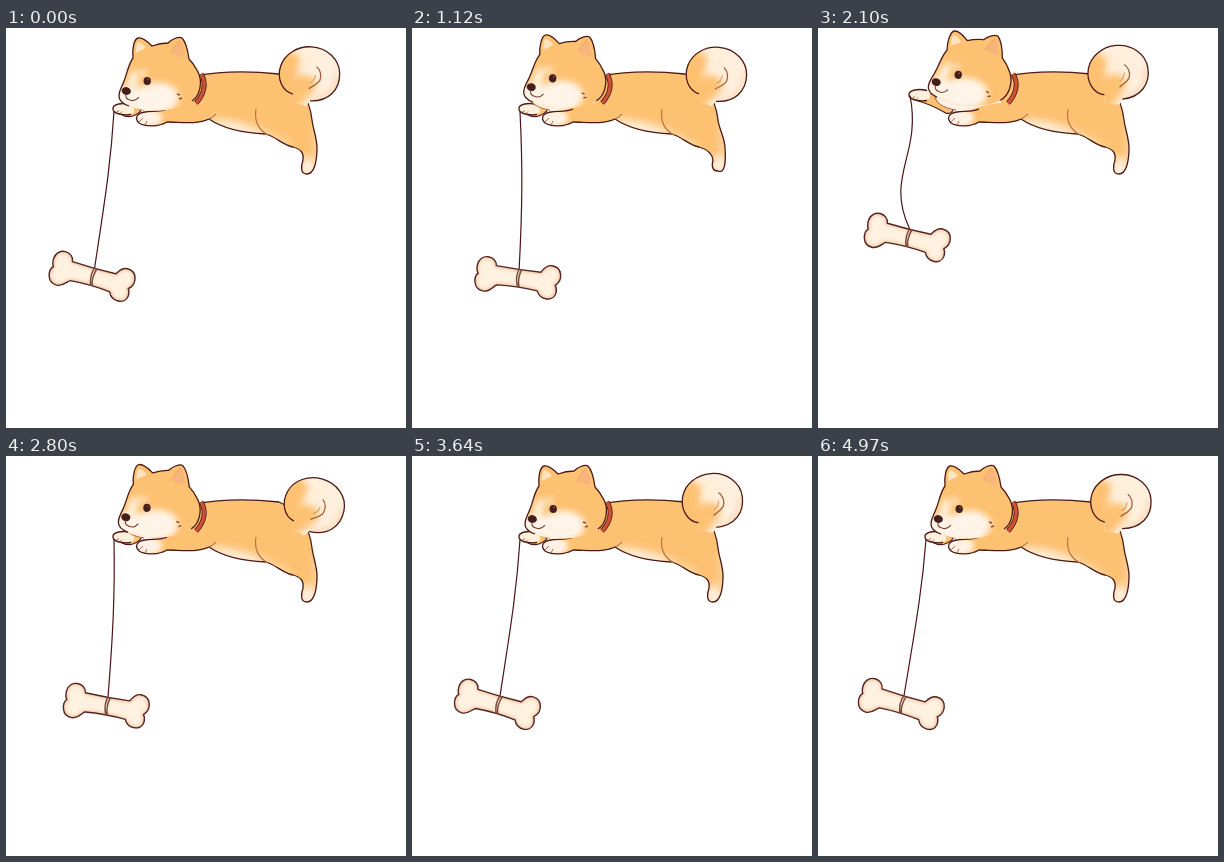
Animation, 400 px wide and 400 px high, one loop 5.04 s. Source, as an HTML page with a canvas:

```html
<!DOCTYPE html>
<html lang="en">
<head>
<meta charset="utf-8">
<title>Puppy with a bone on a string</title>
<style>
html, body { margin: 0; width: 100%; height: 100%; overflow: hidden; background: #fff; }
canvas { display: block; width: 100vmin; height: 100vmin; }
</style>
</head>
<body>
<canvas id="stage" width="400" height="400"></canvas>
<script>
const ctx = document.getElementById('stage').getContext('2d');
const LOOP = 5040, STEP = 70, STRING = 157.5;
const INK = '#4c1a16', ORANGE = '#fdc172', CREAM = '#fff0de', SHADE = '#eda866';

// [time, value] keys, eased between neighbours
const swing = [[-80, -22], [440, 24], [860, -22], [1290, 10], [1680, -9], [1980, 4], [2310, -11],
  [2600, -18], [3110, 18], [3650, -20], [4310, 24], [4960, -22], [5480, 24]];
const reach = [[1190, 0], [1610, 1], [2240, 1], [2470, 0]];
const slack = [[1680, 0], [2030, 25], [2120, 24], [2330, 0]];
const nod = [[560, 0], [1120, 0.055], [1610, 0.14], [2070, 0.125], [2300, 0.135], [2800, 0.025], [3080, 0]];
const wag = [[-280, -3], [350, 3], [910, -2], [1120, 1], [1610, 8], [2170, -6.5], [2850, 8],
  [3520, -6], [4240, 2], [4760, -3], [5390, 3]];
const kick = [[420, 0], [1120, 1], [1750, 0.3], [2100, 0]];
const twist = [[1260, 0], [1680, 5], [2100, 6], [2580, 0]];

function at(keys, t) {
  if (t <= keys[0][0]) return keys[0][1];
  for (let i = 1; i < keys.length; i++) {
    const [t0, a] = keys[i - 1], [t1, b] = keys[i];
    if (t <= t1) return a + (b - a) * (1 - Math.cos(Math.PI * (t - t0) / (t1 - t0))) / 2;
  }
  return keys[keys.length - 1][1];
}

function line(d, color = INK, width = 1.3) {
  ctx.strokeStyle = color;
  ctx.lineWidth = width;
  ctx.stroke(new Path2D(d));
}

function fill(d, color) {
  ctx.fillStyle = color;
  ctx.fill(new Path2D(d));
}

function dot(x, y, rx, ry, color, angle = 0) {
  ctx.fillStyle = color;
  ctx.beginPath();
  ctx.ellipse(x, y, rx, ry, angle, 0, 7);
  ctx.fill();
}

function inside(d, draw) {
  ctx.save();
  ctx.clip(new Path2D(d));
  draw();
  ctx.restore();
}

function blurred(px, draw) {
  ctx.save();
  ctx.filter = `blur(${px}px)`;
  draw();
  ctx.restore();
}

function turned(x, y, angle, draw) {
  ctx.save();
  ctx.translate(x, y);
  ctx.rotate(angle);
  ctx.translate(-x, -y);
  draw();
  ctx.restore();
}

function drawString(x, y, kx, ky, loose) {
  const h = ky - y, w = loose / 24, dx = kx - x;
  line(`M${x} ${y}C${x + dx * .33 + 3 + 9 * w} ${y + h * (.35 + .1 * w)} ` +
    `${x + dx * .67 + 3 - 28 * w} ${y + h * .6} ${kx} ${ky}`, '#4a1418', 1.2);
}

function drawBone(x, y, angle) {
  const d = 'M-23 0C-24 -10 -41 -11 -42 2C-42 7 -41 9 -40 10C-44 14 -43 27 -32 27' +
    'C-26 27 -23 21 -20 19Q0 17 21 19C25 28 39 28 40 18C40 14 39 12 38 11' +
    'C45 5 43 -8 32 -8C26 -8 24 -3 22 0Q0 1 -23 0Z';
  ctx.save();
  ctx.translate(x, y);
  ctx.rotate(angle);
  fill(d, '#fff1df');
  inside(d, () => blurred(1.5, () => line(d, '#edc9ac', 4)));
  line(d, '#56241f', 1.4);
  line('M0 0Q-3 9 1 18M2.5 0Q-.5 10 2.5 18', '#7d4a3c', 1.5);
  ctx.restore();
}

function drawFarPaw(x, y) {
  const arm = `M130 80Q${(x + 130) / 2} ${y + 4} ${x} ${y}`;
  ctx.lineCap = 'round';
  line(arm, INK, 12);
  line(arm, ORANGE, 9.6);
  ctx.lineCap = 'butt';
  const d = `M${x + 11} ${y - 3}C${x + 4} ${y - 7} ${x - 11} ${y - 7} ${x - 10} ${y}` +
    `C${x - 9} ${y + 5} ${x + 6} ${y + 6} ${x + 11} ${y + 3}Z`;
  fill(d, CREAM);
  line(`M${x + 8} ${y - 5}C${x} ${y - 7} ${x - 11} ${y - 6} ${x - 10} ${y}` +
    `C${x - 9} ${y + 5} ${x + 3} ${y + 6} ${x + 8} ${y + 5}`);
  line(`M${x - 7} ${y + 3}l3 -2M${x - 3} ${y + 4}l2 -2`, '#a5654c', .9);
}

function drawBody(k) {
  const rump = 'M190 48C215 43 245 43 273 46C290 53 303 66 306 92';
  const leg = `C307 101 ${311 + 2 * k} 110 ${311 + 2 * k} 120` +
    `C${311 + 3 * k} 134 ${308 + 5 * k} 146 ${301 + 5 * k} ${146 - 3 * k}` +
    `C${294 + 5 * k} ${146 - 3 * k} ${295 + 5 * k} ${138 - 2 * k} ${297 + 4 * k} 132` +
    `C${298 + 2 * k} 124 294 121 287 119`;
  const belly = 'C277 117 270 109 260 106C238 105 216 100 203 91';
  const d = rump + leg + belly + 'L178 94L165 75Z';
  fill(d, ORANGE);
  inside(d, () => blurred(4, () => {
    dot(232, 101, 31, 6, '#fff1e0', .24);
    dot(302 + 5 * k, 140 - 2 * k, 9, 11, '#fff0e2');
    dot(272, 114, 17, 4, '#ffe2b5', .45);
    line('M309 98Q313 115 311 132', '#ffe6c6', 4);
  }));
  line(rump + leg + belly);
  line('M250 81C248 93 253 102 262 107', '#b96f3c', 1.1);
}

function drawTail(shift) {
  const d = 'M287 66C276 63 271 50 275 38C279 26 292 18 306 19C322 20 334 32 334 46' +
    'C334 62 323 74 304 73';
  turned(292, 70, shift / 39, () => {
    const closed = d + 'L300 78L286 74Z';
    fill(closed, CREAM);
    inside(closed, () => {
      blurred(3.5, () => {
        line('M293 78C278 64 272 44 287 24', ORANGE, 26);
        dot(297, 58, 13, 11, ORANGE, -.3);
        dot(304, 34, 9, 7, '#ffedd6', -.4);
      });
      blurred(3, () => line('M305 73C323 73 332 60 333 45', '#f8d2b0', 4));
    });
    line(d);
    line('M303 61C306 58 309 59 314 53C316 48 315 42 311 39', '#a65e3a', 1.3);
    line('M304 55Q309 53 310 47', '#d9985d', 1);
  });
}

function drawThroat() {
  fill('M117 64C117 74 124 80 140 83L183 79L182 56Z', '#fff2e4');
  line('M116 66C117 75 125 80 138 82', '#a5654c', 1);
}

function drawNearArm() {
  const under = 'M203 91C190 97 174 94 161 94C153 99 139 99 133 95C128 90 131 85 139 84';
  const d = under + 'C154 83 165 76 181 75L205 80Z';
  fill(d, ORANGE);
  inside(d, () => blurred(2.5, () => dot(139, 90, 17, 10, '#fff2e5')));
  line(under + 'C146 83 155 84 161 81');
  line('M133 94l4 -4M139 97l2 -4', '#a5654c', .9);
  line('M203 91Q207 89 210 86', '#a55a32', 1);
}

function drawCollar() {
  const d = 'M195 46C201 55 198 67 190 75';
  line(d, INK, 5);
  line(d, '#cf5236', 3.2);
}

function drawHead(angle) {
  const d = 'M127 30C126 21 128 11 132 10C137 9 142 14 146 18Q154 15 162 15' +
    'C166 11 173 8 176 10C180 14 182 24 183 31C192 39 196 49 195 58C193 68 188 73 181 76' +
    'C166 83 148 84 133 81C121 79 113 75 113 68C113 62 116 59 118 53C121 46 122 37 127 30Z';
  turned(190, 42, angle, () => {
    fill(d, ORANGE);
    inside(d, () => {
      blurred(3, () => {
        dot(123, 70, 15, 12, '#fff4e8');
        dot(149, 71, 24, 16, '#fff4e8', -.15);
        dot(127, 53, 5, 11, '#fff0db', .25);
        dot(137, 45, 4, 3, '#fff0db', -.3);
      });
      blurred(.7, () => {
        fill('M165 24Q170 15 175 13Q178 20 179 29Q171 28 165 24Z', '#f7b57b');
        fill('M130 25Q130 15 132 14Q138 16 140 20Z', '#ffe3be');
      });
    });
    line('M186 73C194 68 197 54 192 44Q188 36 183 31C182 24 180 14 176 10C173 8 166 11 162 15' +
      'Q154 15 146 18C142 14 137 9 132 10C128 11 126 21 127 30C122 37 121 46 118 53' +
      'C116 59 113 62 113 68C113 73 117 76 123 78');
    line('M165 25Q168 18 174 12', SHADE, 1);
    dot(141.2, 53, 3.7, 4.1, '#43201d');
    dot(142.1, 51.4, .8, .8, '#8a6255');
    dot(120.3, 63, 4.6, 3.9, '#43201d', .2);
    line('M120 66Q119 71 124 72Q129 74 133 69', '#7b4030', 1.1);
    line('M171 66l3 1M173 71l3 -1', '#8a4a32', 1.4);
  });
}

function draw(t) {
  ctx.fillStyle = '#fff';
  ctx.fillRect(0, 0, 400, 400);
  ctx.lineJoin = 'round';
  const lift = at(reach, t), dx = at(swing, t), loose = at(slack, t);
  const px = 117 - 16 * lift, py = 81.5 - 14 * lift;
  const sx = px - 9, sy = py + 2 - lift * 2;
  const kx = sx + dx, ky = sy + Math.sqrt(STRING ** 2 - dx ** 2) - loose;
  const tilt = 8 - .4 * dx + at(twist, t);

  drawBone(kx, ky, tilt * Math.PI / 180);
  drawFarPaw(px, py);
  drawString(sx, sy, kx, ky, loose);
  drawBody(at(kick, t));
  drawTail(at(wag, t));
  drawThroat();
  drawNearArm();
  drawCollar();
  drawHead(at(nod, t));
}

const start = performance.now();
function tick() {
  const t = (performance.now() - start) % LOOP;
  draw(Math.floor(t / STEP) * STEP);
  requestAnimationFrame(tick);
}
tick();
</script>
</body>
</html>
```
